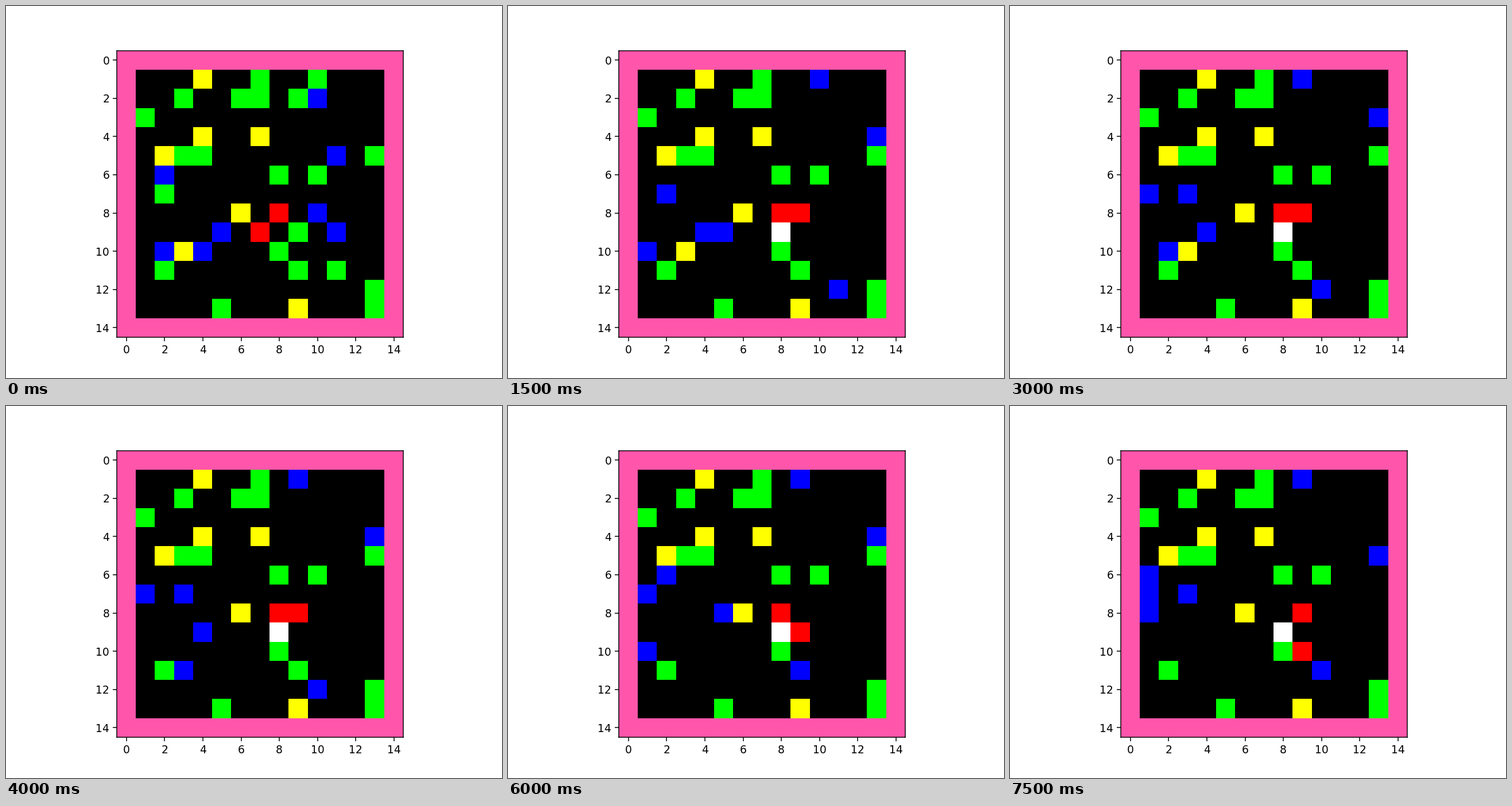
A matplotlib script that plays this animation: 864x648 px, repeating every 8 s.

```python
import numpy as np
import matplotlib.pyplot as plt
from matplotlib.animation import FuncAnimation

SIZE, STEPS, STEP_MS = 15, 16, 500

WALL, GRASS, FRUIT = (255, 85, 170), (0, 255, 0), (255, 255, 0)
PREY, HUNTER, DEAD = (0, 0, 255), (255, 0, 0), (255, 255, 255)

MOVES = {"U": (-1, 0), "D": (1, 0), "L": (0, -1), "R": (0, 1), ".": (0, 0)}

# Columns of food in each row
GRASS_AT = {1: (7, 10), 2: (3, 6, 7, 9), 3: (1,), 5: (3, 4, 13), 6: (8, 10),
            7: (2,), 9: (9,), 10: (8,), 11: (2, 9, 11), 12: (13,), 13: (5, 13)}
FRUIT_AT = {1: (4,), 4: (4, 7), 5: (2,), 8: (6,), 10: (3,), 13: (9,)}

# Start cell (row, column) and one move per step; a short walk ends in death
PREY_WALKS = [
    ((2, 10), "LRULRLRLRDLUR.L"),
    ((5, 11), "RURLURD.U..D..D"),
    ((6, 2), "RDLLUDRLU..DRDL"),
    ((8, 10), "DLL"),
    ((9, 5), "ULDULURLULDULUD"),
    ((10, 4), "UR.ULDRLURDUULL"),
    ((10, 2), "L..URDRDUL.LUUU"),
    ((9, 11), "DDDLUDLRUULDRDU"),
]
HUNTER_WALKS = [
    ((8, 8), "R........RDLRDL"),
    ((9, 7), "UR..........URD"),
]


def trace(start, walk):
    path = [start]
    for step in walk:
        (r, c), (dr, dc) = path[-1], MOVES[step]
        path.append((r + dr, c + dc))
    return path


prey = [trace(*w) for w in PREY_WALKS]
hunters = [trace(*w) for w in HUNTER_WALKS]


def world(t):
    grid = np.zeros((SIZE, SIZE, 3), np.uint8)
    for food, color in ((GRASS_AT, GRASS), (FRUIT_AT, FRUIT)):
        for row, cols in food.items():
            grid[row, list(cols)] = color
    for path in prey:
        for cell in path[:t + 1]:
            grid[cell] = 0  # food is eaten along the way
    for path in prey:
        dead = len(path) < STEPS and t >= len(path) - 1
        grid[path[-1] if dead else path[t]] = DEAD if dead else PREY
    for path in hunters:
        grid[path[t]] = HUNTER
    grid[[0, -1]] = WALL
    grid[:, [0, -1]] = WALL
    return grid


fig, ax = plt.subplots(figsize=(6.4, 4.8), dpi=135)
image = ax.imshow(world(0))


def update(t):
    image.set_data(world(t))
    return (image,)


anim = FuncAnimation(fig, update, frames=STEPS, interval=STEP_MS,
                     repeat=True, repeat_delay=0)
plt.show()
```
